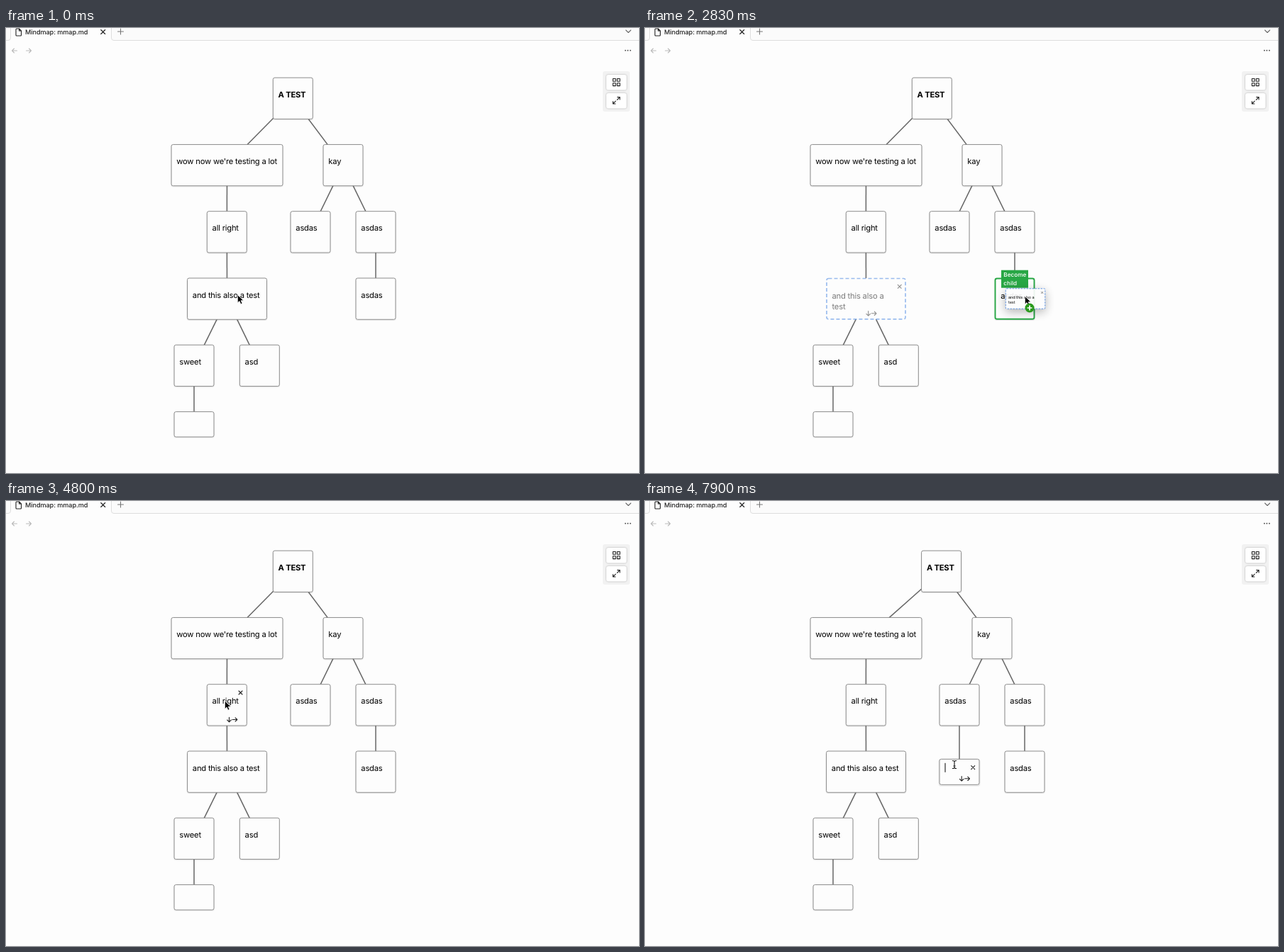
Animation of 892 by 628 pixels, one loop 8 s. Source, as an HTML page:

```html
<!DOCTYPE html>
<html lang="en">
<head>
<meta charset="utf-8">
<title>Mind map</title>
<style>
html, body { margin: 0; width: 100%; height: 100%; overflow: hidden; background: #fdfdfd; }
svg { display: block; font-family: Inter, "Open Sans", sans-serif; }
text { font-size: 11.2px; letter-spacing: -0.2px; fill: #000; white-space: pre; text-rendering: geometricPrecision; }
.tab { font-size: 9.1px; font-weight: 500; letter-spacing: -0.05px; fill: #222; }
.root { font-weight: 700; }
.label text { font-size: 8.2px; letter-spacing: 0; fill: #fff; font-weight: 500; }
.icon { fill: none; stroke: #222; stroke-width: 1.1; stroke-linecap: round; stroke-linejoin: round; }
.pale { stroke: #bbb; }
.edge { stroke: #666; stroke-width: 1.5; }
.box { fill: #fdfdfd; stroke: #8c8c8c; stroke-width: 1; }
.shade { fill: none; stroke: #000; stroke-opacity: .08; }
.ghost { filter: drop-shadow(0 8px 14px rgba(0, 0, 0, .32)); }
.button { fill: #fff; filter: drop-shadow(0 .5px 1px rgba(0, 0, 0, .3)); }
</style>
</head>
<body>
<svg width="892" height="628" viewBox="0 0 892 628">
  <path d="M0 0H892V17.500H152Q148.500 17.500 148.500 14V0H6.500V14Q6.500 17.500 3 17.500H0Z" fill="#fbfbfb"/>
  <path d="M0 17.500H3Q6.500 17.500 6.500 14V0M148.500 0V14Q148.500 17.500 152 17.500H892" fill="none" stroke="#dedede"/>
  <path class="icon" d="M18.500 1H15Q14 1 14 2V10Q14 11 15 11H20.500Q21.500 11 21.500 10V4ZV4H21.500"/>
  <text class="tab" x="27" y="9">Mindmap: mmap.md</text>
  <path class="icon" d="M133.700 2.500L139.700 8.500M139.700 2.500L133.700 8.500"/>
  <path class="icon" stroke-opacity=".6" d="M157.500 5H165.500M161.500 1V9"/>
  <path class="icon" stroke-opacity=".65" d="M873.500 3L877 6.500L880.500 3"/>
  <path class="icon pale" d="M15.500 32H8.500M11.500 29L8.500 32L11.500 35M28.500 32H35.500M32.500 29L35.500 32L32.500 35"/>
  <g fill="#444"><circle cx="872.800" cy="31.700" r=".9"/><circle cx="876.300" cy="31.700" r=".9"/><circle cx="879.800" cy="31.700" r=".9"/></g>
  <rect x="841" y="61" width="38" height="57" rx="3" fill="#f2f2f2"/>
  <rect class="button" x="846" y="66" width="28.500" height="21.500" rx="3"/>
  <rect class="button" x="846" y="92" width="28.500" height="21.500" rx="3"/>
  <path class="icon" d="M855.300 71.500h3.800v3.800h-3.800zM861.300 71.500h3.800v3.800h-3.800zM861.300 77.800h3.800v3.800h-3.800zM855.300 77.800h3.800v3.800h-3.800z"/>
  <path class="icon" d="M861.500 97.500H865V101M865 97.500L861.200 101.300M855.300 103.500V107H858.800M855.300 107L859.100 103.200"/>
  <g id="scene"></g>
</svg>
<script>
const LOOP = 8000;
const GREEN = '#28a745', BLUE = '#3a7de0';
const scene = document.getElementById('scene');

// cursor stops: time, x, y
const path = [
  [0, 327, 377], [30, 327, 377], [830, 362, 370], [970, 362, 370], [1570, 314, 376],
  [1800, 314, 376], [2270, 335, 367], [2600, 526, 378], [2830, 536, 379], [3000, 536, 380],
  [3600, 536, 380], [4030, 511, 462], [4170, 511, 462], [4400, 335, 326], [4570, 314, 288],
  [4970, 309, 284], [5200, 309, 284], [5570, 497, 375], [6000, 413, 304], [6030, 413, 304],
  [6130, 428, 306], [6640, 428, 306], [7200, 436, 377], [7370, 436, 377], [7430, 439, 377],
  [7570, 439, 377], [7800, 436, 372], [LOOP, 436, 372]
];
// dragging spans: start, drop, grab offset inside the preview
const drags = [[1950, 3000, 28, 11.5], [4170, 4750, 21, 6]];
const MOVED = 3000, RESTORED = 4750, ADDED = 6600, EDIT = 7600;

const still = (a, b) => a[1] === b[1] && a[2] === b[2];

function slope(i, k) {
  const a = path[i - 1], b = path[i], c = path[i + 1];
  if (!a || !c || still(a, b) || still(b, c)) return 0;
  return (c[k] - a[k]) / (c[0] - a[0]);
}

function cursorAt(t) {
  let i = 0;
  while (i < path.length - 2 && path[i + 1][0] <= t) i++;
  const a = path[i], b = path[i + 1], d = b[0] - a[0], u = (t - a[0]) / d;
  const at = k => {
    const e = u * u * (3 - 2 * u);
    return a[k] + (b[k] - a[k]) * e
      + d * u * (1 - u) * ((1 - u) * slope(i, k) - u * slope(i + 1, k));
  };
  return { x: at(1), y: at(2) };
}

const rowY = r => 70.15 + 94.28 * r;

function layout(t) {
  const moved = t >= MOVED && t < RESTORED;
  const added = t >= ADDED;
  const s = added ? 14 : 0, dx = moved ? 210 : 0, dr = moved ? 1 : 0;
  const list = [];
  const node = (id, text, x, row, parent, w = 56, h = 58.3) => {
    const n = { id, text, x, y: rowY(row), w, h, parent };
    list.push(n);
    return n;
  };
  const root = node('root', 'A TEST', 376.3 + (added ? 13.3 : 0), 0);
  const wow = node('wow', "wow now we're testing a lot", 233, 1, root, 157);
  const right = node('right', 'all right', 283.3, 2, wow);
  const kay = node('kay', 'kay', 447 + s, 1, root);
  const left = node('left', 'asdas', 401 + s, 2, kay);
  const mid = node('mid', 'asdas', 493 + s, 2, kay);
  const leaf = node('leaf', 'asdas', 493 + s, 3, mid);
  const main = node('main', 'and this also a test', 255.5 + dx, 3 + dr, moved ? leaf : right, 112);
  const sweet = node('sweet', 'sweet', 237 + dx, 4 + dr, main);
  node('asd', 'asd', 329.3 + dx, 4 + dr, main);
  node('blank', '', 237 + dx, 5 + dr, sweet, 56, 35.5);
  if (added) node('fresh', '', 415, 3, left, 56, 36).y = 364.3;
  return list;
}

const inside = (n, p) => p.x >= n.x && p.x <= n.x + n.w && p.y >= n.y && p.y <= n.y + n.h;

const rect = (n, attrs) =>
  `<rect x="${n.x}" y="${n.y}" width="${n.w}" height="${n.h}" rx="2.5" ${attrs}/>`;

const words = (x, y, s, cls = '') => `<text class="${cls}" x="${x}" y="${y}">${s}</text>`;

function tools(n) {
  const x = n.x + n.w - 8.8, y = n.y + 11.8;
  const ax = n.x + n.w / 2 + 3.2, ay = n.y + n.h - 8.5;
  return `<path class="icon" d="M${x - 2.5} ${y - 2.5}l5 5m0 -5l-5 5
    M${ax} ${ay - 3.3}v6.600m-2.800 -2.800l2.800 2.800l2.800 -2.800
    M${ax + 4.5} ${ay}h6.800m-2.700 -2.700l2.700 2.700l-2.700 2.700"/>`;
}

const wrapped = n => words(n.x + 8, n.y + 28.8, 'and this also a') + words(n.x + 8, n.y + 43.8, 'test');

const inset = n => ({ x: n.x + .5, y: n.y + .5, w: n.w - 1, h: n.h - 1 });

const dashes = n => rect(inset(n),
  `fill="#fdfdfd" stroke="${BLUE}" stroke-width="1.700" stroke-dasharray="5 3"`);

const greenFrame = n => rect(inset(n), `fill="#fdfdfd" stroke="${GREEN}" stroke-width="1.900"`);

function label(n, w) {
  const x = n.x + n.w / 2 - w / 2, y = n.y - 11.3;
  return `<g class="label"><rect x="${x}" y="${y}" width="${w}" height="25" fill="${GREEN}"/>`
    + words(x + 3.3, y + 9.3, 'Become') + words(x + 3.3, y + 21.8, 'child') + '</g>';
}

function drawNode(n, s) {
  const held = s.drag && n.id === 'main';
  const over = s.target === n;
  if (held) {
    return rect(n, 'fill="#fdfdfd"') + '<g opacity=".5">'
      + (over ? greenFrame(n) : dashes(n)) + wrapped(n) + tools(n)
      + (over ? label(n, 55) : '') + '</g>';
  }
  const focus = s.edit && n.id === 'fresh';
  let out = rect({ ...n, y: n.y + 1 }, `class="shade" stroke-width="${focus ? 3 : 1.5}"`);
  out += over ? greenFrame(n) : rect(n, 'class="box"');
  if (n.text) out += words(n.x + 7.3 + over, n.y + 27.6 + over, n.text, n.id === 'root' ? 'root' : '');
  if (s.hover === n || focus) out += tools(n);
  if (focus) out += `<path d="M${n.x + 8} ${n.y + 5.5}v13" stroke="#000"/>`;
  return out + (over ? label(n, 38) : '');
}

function edge(n) {
  const p = n.parent;
  return p ? `<line class="edge" x1="${p.x + p.w / 2}" y1="${p.y + p.h / 2}" x2="${n.x + n.w / 2}" y2="${n.y + n.h / 2}"/>` : '';
}

function ghost(drag, p) {
  const n = { x: 0, y: 0, w: 112, h: 58 };
  return `<g class="ghost" opacity=".92" transform="translate(${p.x - drag[2]} ${p.y - drag[3]}) scale(.5)">`
    + dashes(n) + wrapped(n) + tools(n) + '</g>';
}

const badge = p => `<g transform="translate(${p.x + 6} ${p.y + 16})">
  <circle r="6.500" fill="#2a9a1c"/><path d="M-3.500 0H3.500M0 -3.500V3.500" stroke="#fff" stroke-width="1.700"/></g>`;

const arrow = p => `<path transform="translate(${p.x - .7} ${p.y - .5})" d="M0 0V11.500L2.700 9L4.600 13.200L6.700 12.300L4.900 8.200H8.500Z"
  stroke="#fff" stroke-width=".8" stroke-linejoin="round"/>`;

const beam = p => `<path transform="translate(${p.x} ${p.y})" fill="none" stroke="#111" stroke-width="1.100"
  d="M-3 -5.500Q0 -5.500 0 -4Q0 -5.500 3 -5.500M0 -4V4M-3 5.500Q0 5.500 0 4Q0 5.500 3 5.500M-1.500 2H1.500"/>`;

function render(t) {
  const p = cursorAt(t), nodes = layout(t);
  const drag = drags.find(d => t >= d[0] && t < d[1]);
  const under = nodes.find(n => inside(n, p));
  const s = {
    drag,
    target: drag && under,
    hover: !drag && t >= MOVED && under,
    edit: t >= EDIT
  };
  const typing = under && under.id === 'fresh';
  scene.innerHTML = nodes.map(edge).join('')
    + nodes.map(n => drawNode(n, s)).join('')
    + (drag ? ghost(drag, p) : '')
    + (typing ? beam(p) : arrow(p))
    + (s.target ? badge(p) : '');
}

function tick() {
  render(performance.now() % LOOP);
  requestAnimationFrame(tick);
}
tick();
</script>
</body>
</html>
```
